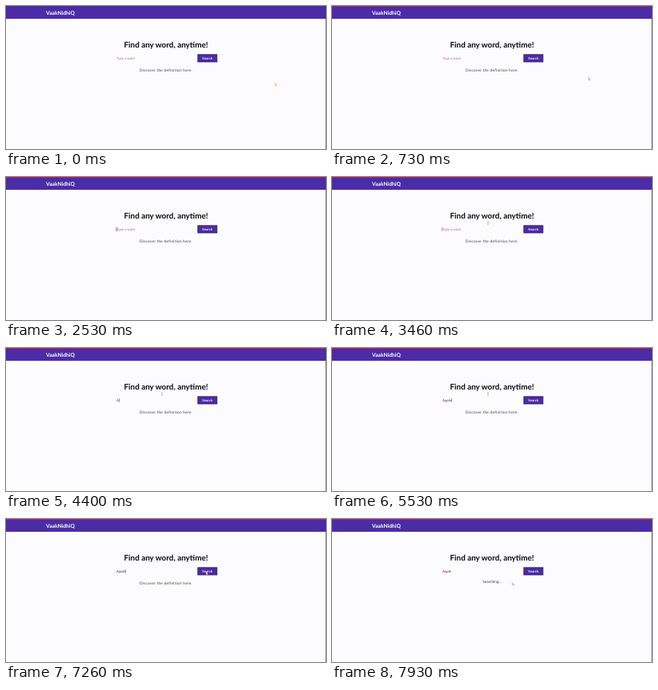
Animation, 400 px wide and 179 px high, one loop 8 s. Source, as an HTML page:

```html
<!DOCTYPE html>
<html lang="en">
<head>
<meta charset="utf-8">
<title>Dictionary search</title>
<style>
  html, body { margin: 0; width: 100%; height: 100%; overflow: hidden; background: #fcfcfe; }
  svg { display: block; width: 100%; height: 100%; }
  text { font-family: Lato, "Open Sans", sans-serif; text-rendering: geometricPrecision; }
  .brand { font-size: 6.7px; font-weight: 700; fill: #fff; }
  .title { font-size: 9.9px; font-weight: 700; fill: #0c0c10; text-anchor: middle; }
  .field { font-size: 4.3px; }
  .label { font-size: 4.3px; font-weight: 700; fill: #f4f0ff; text-anchor: middle; }
  .status { font-size: 4.7px; fill: #35353c; text-anchor: middle; }
</style>
</head>
<body>
<svg viewBox="0 0 400 179" preserveAspectRatio="none">
  <rect width="400" height="179" fill="#fcfcfe"/>
  <rect width="400" height="16" fill="#4b2ca6"/>
  <rect id="edge" width="400" height="1"/>
  <rect x="399.3" y="16" width=".7" height="163" fill="#85858c"/>
  <text class="brand" x="50" y="10.5">VaakNidhiQ</text>
  <text class="title" x="200" y="52.3">Find any word, anytime!</text>
  <text id="field" class="field" x="138" y="67"></text>
  <rect id="caret" y="63.2" width=".5" height="4.6" fill="#3a2a40"/>
  <rect x="239.8" y="60.8" width="24" height="9.2" fill="#4b2ca6" stroke="#2c1b62" stroke-width=".8"/>
  <text class="label" x="251.8" y="66.9">Search</text>
  <text id="status" class="status" x="200"></text>
  <g id="pointer">
    <path id="arrow" d="M0 0V3.4L.9 2.7L1.5 4L2.1 3.7L1.5 2.5H2.6Z" fill="#fff" stroke-width=".5"/>
    <path id="beam" d="M-.6 -1.8H.6M0 -1.8V1.8M-.6 1.8H.6" fill="none" stroke="#777" stroke-width=".5"/>
  </g>
</svg>
<script>
const LOOP = 8000;
const WORD = "Apple";
const FOCUS = 2200, TYPE = 4340, KEY = 200, CLICK = 7400;
// time, x, y
const path = [
  [0, 336.3, 96.3], [500, 336.3, 96.3], [1530, 212.5, 41], [2150, 139, 65.5],
  [2700, 139, 65.5], [3300, 195, 57.5], [6700, 195, 57.5], [7250, 250, 66],
  [7450, 250, 66], [7850, 225.3, 79.5], [LOOP, 225.3, 79.5]
];
const $ = id => document.getElementById(id);
const ui = {};
for (const id of ["edge", "field", "caret", "status", "pointer", "arrow", "beam"]) ui[id] = $(id);

const ease = p => p * p * (3 - 2 * p);

function position(t) {
  const i = path.findIndex(p => p[0] > t);
  const [a, b] = [path[i - 1], path[i]];
  const k = ease((t - a[0]) / (b[0] - a[0]));
  return [a[1] + (b[1] - a[1]) * k, a[2] + (b[2] - a[2]) * k];
}

function show(el, on) { el.setAttribute("visibility", on ? "visible" : "hidden"); }

function render(t) {
  const first = t < 60;
  const typed = WORD.slice(0, Math.max(0, Math.min(WORD.length, Math.floor((t - TYPE) / KEY) + 1)));
  const searching = t >= CLICK;

  ui.edge.setAttribute("fill", first ? "#4b2ca6" : "#c41d58");
  ui.field.textContent = typed || "Type a word";
  ui.field.setAttribute("fill", typed ? "#6a1c40" : first ? "#a070c0" : "#b2688c");

  const typing = t >= TYPE && t < TYPE + KEY * WORD.length;
  const blink = typing || (t - FOCUS) % 1000 < 500;
  show(ui.caret, t >= FOCUS && !searching && blink);
  ui.caret.setAttribute("x", typed ? 138.2 + ui.field.getComputedTextLength() : 137.6);

  ui.status.textContent = searching ? "Searching..." : "Discover the definition here.";
  ui.status.setAttribute("y", searching ? 80.4 : 81.7);
  ui.status.setAttribute("letter-spacing", searching ? 0 : .26);

  const [x, y] = position(t);
  const overField = x > 134 && x < 238 && y > 56 && y < 71;
  ui.pointer.setAttribute("transform", `translate(${x.toFixed(2)} ${y.toFixed(2)})`);
  ui.arrow.setAttribute("stroke", first ? "#e0a048" : "#a8868a");
  show(ui.arrow, !overField);
  show(ui.beam, overField);
}

function tick() {
  render(performance.now() % LOOP);
  requestAnimationFrame(tick);
}
tick();
</script>
</body>
</html>
```
